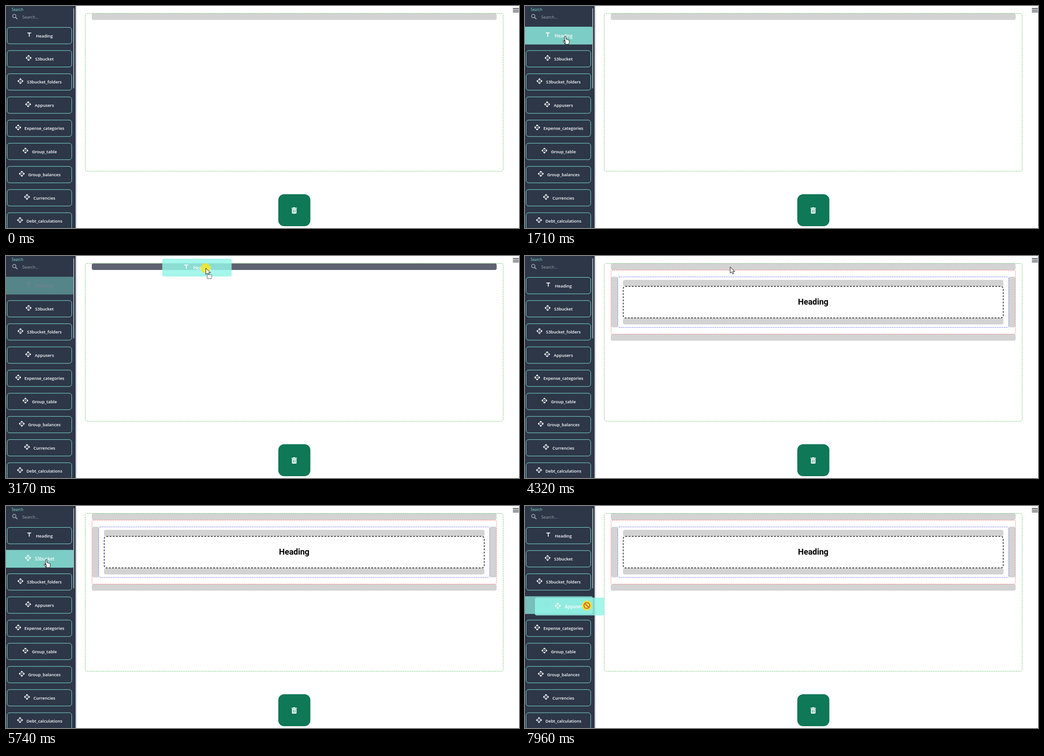
Recreate the animation shown at these times as an HTML page with a canvas. Size 1136 px wide and 493 px high, loop 8 s.

```html
<!DOCTYPE html>
<html lang="en">
<head>
<meta charset="utf-8">
<title>Page builder</title>
<style>
  html, body { margin: 0; width: 100%; height: 100%; overflow: hidden; background: #fff; }
  canvas { display: block; }
</style>
</head>
<body>
<canvas id="stage" width="1136" height="493"></canvas>
<script>
const ctx = document.getElementById('stage').getContext('2d');
const LOOP = 8000;
const UI_FONT = '"Open Sans", "Noto Sans", sans-serif';

// Label and icon centre of each sidebar button
const items = [
  ['Heading', 51.5], ['S3bucket', 50], ['S3bucket_folders', 32],
  ['Appusers', 49], ['Expense_categories', 27], ['Group_table', 43],
  ['Group_balances', 35], ['Currencies', 46.5], ['Debt_calculations', 31]
];
const itemTop = i => 47.5 + i * 51.45;
const ITEM_H = 36.5;

// Motion as [time, x, y]
const pointerPath = [
  [400, 715, -25], [460, 690, -8], [530, 630, 4], [700, 490, 22], [1080, 223, 55],
  [1220, 160, 62], [1290, 138, 64], [1710, 89, 67], [2180, 91, 68], [2570, 189, 69],
  [2970, 396, 34], [3170, 442, 27], [3370, 453, 24], [4660, 454, 24], [4900, 385, 42],
  [5270, 158, 68], [5410, 112, 68], [5480, 101, 76], [5740, 89, 119], [5870, 90, 119],
  [6800, 90, 119], [7200, 100, 172], [7550, 112, 212], [7750, 112, 218], [7820, 114, 218],
  [7960, 137, 221]
];
const drags = [
  { item: 0, press: 1890, start: 2180, drop: 3970,
    path: [[2180, -6, 47], [2570, 89, 48.5], [2970, 300, 12], [3170, 346, 6], [3370, 356, 3]] },
  { item: 3, press: 7750, start: 7820, drop: LOOP,
    path: [[7820, -1, 201], [7960, 22, 203.5]] }
];
const OVER_BAR = 3040, BUILT = 4040;

const icons = {
  api: new Path2D('M14 12l-2 2-2-2 2-2zM12 6l2.1 2.1 2.5-2.5L12 1 7.4 5.6l2.5 2.5zM6 12l2.1-2.1-2.5-2.5L1 12l4.6 4.6 2.5-2.5zM18 12l-2.1 2.1 2.5 2.5L23 12l-4.6-4.6-2.5 2.5zM12 18l-2.1-2.1-2.5 2.5L12 23l4.6-4.6-2.5-2.5z'),
  title: new Path2D('M5 4v3h5.5v12h3V7H19V4z'),
  trash: new Path2D('M-6-6h3.5l1-1h3l1 1H6v1.7H-6zM-5-3.5H5V5.5Q5 7 3.5 7h-7Q-5 7-5 5.5zM-2.5-1.5v6.5h1.3v-6.5zM1.2-1.5v6.5h1.3v-6.5z'),
  arrow: new Path2D('M0 0V14.2L3.3 11.2 5.5 16 7.8 15 5.7 10.4H10.2z'),
  hand: new Path2D('M-1.6 11V1Q-1.6-.8 0-.8T1.6 1V6Q3.4 5 4.4 6.8 6.2 5.8 7 7.5 9 7 9 9V12.5Q9 15 7.4 17H0Q-1-1 0 17-1.5 14.5-4.5 11-4.6 9-3.2 9.2z')
};

function along(path, t) {
  const last = path[path.length - 1];
  if (t <= path[0][0]) return path[0].slice(1);
  if (t >= last[0]) return last.slice(1);
  const i = path.findIndex(p => p[0] > t);
  const [a, b] = [path[i - 1], path[i]];
  const k = (t - a[0]) / (b[0] - a[0]);
  return [a[1] + (b[1] - a[1]) * k, a[2] + (b[2] - a[2]) * k];
}

function box(x, y, w, h, r, fill, stroke, width = 1, dash = []) {
  ctx.beginPath();
  ctx.roundRect(x, y, w, h, r);
  if (fill) { ctx.fillStyle = fill; ctx.fill(); }
  if (stroke) {
    ctx.strokeStyle = stroke;
    ctx.lineWidth = width;
    ctx.setLineDash(dash);
    ctx.stroke();
    ctx.setLineDash([]);
  }
}

function text(str, x, y, font, color, align = 'left') {
  ctx.font = font;
  ctx.fillStyle = color;
  ctx.textAlign = align;
  ctx.fillText(str, x, y);
}

function line(x1, y1, x2, y2, color, width) {
  ctx.strokeStyle = color;
  ctx.lineWidth = width;
  ctx.beginPath();
  ctx.moveTo(x1, y1);
  ctx.lineTo(x2, y2);
  ctx.stroke();
}

function disc(x, y, r, fill) {
  ctx.beginPath();
  ctx.arc(x, y, r, 0, 7);
  ctx.fillStyle = fill;
  ctx.fill();
}

// Icon and label around the centre of a button
function itemContent(i, cx, cy, scale, color) {
  const [label, iconX] = items[i];
  ctx.save();
  ctx.translate(cx, cy);
  ctx.scale(scale, scale);
  text(label, 10.8, 3.8, '600 9.4px ' + UI_FONT, color, 'center');
  ctx.translate(iconX - 74.2, -1.9);
  ctx.scale(.6, .6);
  ctx.translate(-12, -12);
  ctx.fill(i ? icons.api : icons.title);
  ctx.restore();
}

function sidebar(t, hover, drag) {
  box(0, 0, 154, 493, 0, '#2d3748');
  const shade = ctx.createLinearGradient(154, 0, 158, 0);
  shade.addColorStop(0, '#b9bcc2');
  shade.addColorStop(1, '#fff');
  box(154, 0, 4, 493, 0, shade);

  text('Search', 12.5, 11.3, '8.2px ' + UI_FONT, '#81e6d9');
  text('Search...', 36, 28, '9.2px ' + UI_FONT, '#a3a8b1');
  ctx.beginPath();
  ctx.arc(18.3, 22.3, 3.7, 0, 7);
  ctx.strokeStyle = '#a8adb6';
  ctx.lineWidth = 1.5;
  ctx.stroke();
  line(21, 25, 25.2, 29.2, '#a8adb6', 1.8);

  items.forEach((item, i) => {
    const y = itemTop(i), cy = y + ITEM_H / 2;
    const dragged = drag && drag.item === i;
    if (dragged || hover === i) {
      ctx.globalAlpha = dragged ? 1 - .48 * Math.max(0, Math.min(1, (t - drag.start - 100) / 250)) : 1;
      box(-3, y - 1.4, 153, 39.4, 4, '#7ccdc5');
      ctx.globalAlpha = 1;
      itemContent(i, 74.2, cy, 1.05, dragged ? 'rgba(145,130,142,.5)' : '#fff');
    } else {
      box(2.5, y, 143, ITEM_H, 5.5, null, '#81e6d9');
      itemContent(i, 74.2, cy, 1, '#fff');
    }
  });
  box(149, 5, 2, 178, 1, '#a4a8b0');
}

function page(t) {
  const grey = '#d3d3d3', dots = [2, 2];
  const over = t >= OVER_BAR && t < drags[0].drop;
  box(190, 16.5, 896.5, 14.5, 4, over ? '#5f6371' : grey);
  box(175.5, 16.5, 925.5, 350.5, 4, null, '#43ad43', 1, dots);

  if (t >= BUILT) {
    box(190, 173.5, 896.5, 14.5, 4, grey);
    box(191, 46, 14.5, 112.5, 4, grey);
    box(1071, 46, 15, 112.5, 4, grey);
    box(217, 53, 842.5, 14, 4, grey);
    box(217, 138, 842.5, 14, 4, grey);
    box(190.5, 31.5, 895.5, 142, 3, null, '#ff5050', 1, dots);
    box(205.5, 46.5, 865.5, 112, 3, null, '#4848f0', 1, dots);
    box(217.5, 67.5, 841.5, 70, 5, '#fff', '#000', 1.4, [4, 3]);
    text('Heading', 638.2, 108.3, '700 18px Roboto, sans-serif', '#000', 'center');
  }

  box(603, 418, 71, 71, 13, '#0f7856');
  ctx.save();
  ctx.translate(638.2, 454);
  ctx.fillStyle = '#fff';
  ctx.fill(icons.trash, 'evenodd');
  ctx.restore();
  for (const y of [5.5, 9.3, 13]) line(1122.5, y, 1135.5, y, '#20242c', 1.6);
}

function shape(path, x, y) {
  ctx.save();
  ctx.translate(x, y);
  ctx.fillStyle = '#fff';
  ctx.strokeStyle = '#111';
  ctx.lineWidth = 1;
  ctx.lineJoin = 'round';
  ctx.fill(path);
  ctx.stroke(path);
  ctx.restore();
}

function pointer(t, x, y, hover, drag, pressed) {
  if (pressed) disc(x, y, t - pressed.press < 70 ? 8 : 11, 'rgba(244,230,34,.85)');
  if (drag && !(t >= OVER_BAR && t < drag.drop && drag.item === 0)) {
    ctx.beginPath();
    ctx.arc(x, y, 6.5, 0, 7);
    ctx.strokeStyle = '#e0522a';
    ctx.lineWidth = 2;
    ctx.stroke();
    line(x - 4.5, y - 4.5, x + 4.5, y + 4.5, '#e0522a', 2);
  } else if (hover >= 0) {
    shape(icons.hand, x, y + 1);
  } else {
    shape(icons.arrow, x + .5, y);
    if (drag) box(x + 3.5, y + 14.5, 10, 9, 1, '#fff', '#111', 1, [2, 1]);
  }
}

function draw(t) {
  const [x, y] = along(pointerPath, t);
  const drag = drags.find(d => t >= d.start && t < d.drop);
  const pressed = drags.find(d => t >= d.press && t < d.drop);
  const hover = drag || x > 149 ? -1
    : items.findIndex((item, i) => y >= itemTop(i) && y <= itemTop(i) + ITEM_H);

  box(0, 0, 1136, 493, 0, '#fff');
  page(t);
  sidebar(t, hover, drag);
  if (drag) {
    const [gx, gy] = along(drag.path, t);
    box(gx, gy, 153.5, 39.5, 4, 'rgba(148,245,232,.84)');
    itemContent(drag.item, gx + 77, gy + 20, 1.05, '#fff');
  }
  pointer(t, x, y, hover, drag, pressed);
}

function tick() {
  draw(performance.now() % LOOP);
  requestAnimationFrame(tick);
}
tick();
</script>
</body>
</html>
```
